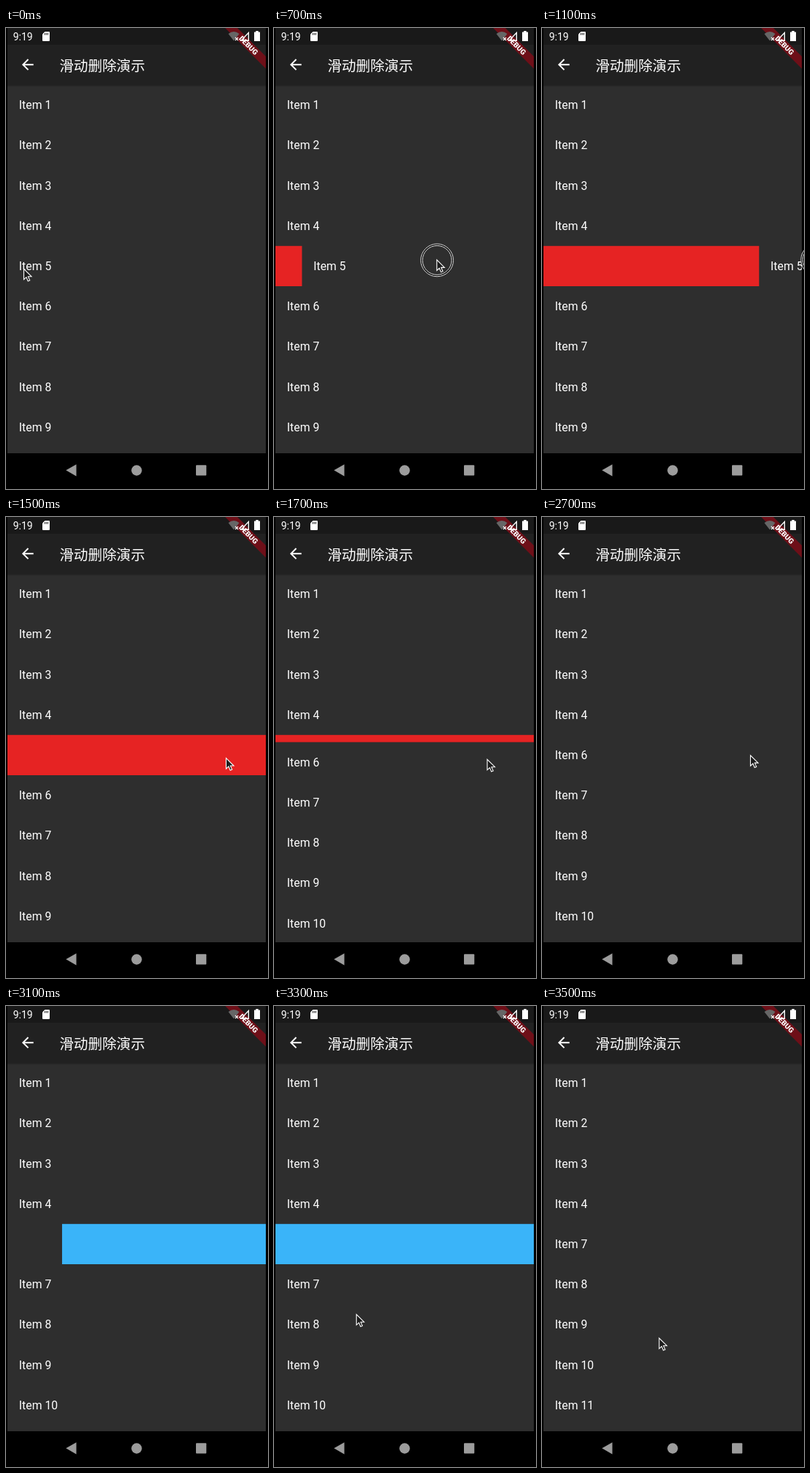
An HTML page for the animation above (3.6 s loop, 360 by 632 pixels).

```html
<!DOCTYPE html>
<html lang="zh">
<head>
<meta charset="utf-8">
<title>滑动删除演示</title>
<style>
  html, body { margin: 0; width: 100%; height: 100%; overflow: hidden; background: #000; }
  svg { display: block; width: 360px; height: 632px; }
  text { font-family: Roboto, "Noto Sans", sans-serif; fill: #fff; }
  .title { font: 500 19.6px "Noto Sans CJK SC", "Noto Sans CJK", sans-serif; }
  .item { font-size: 15.8px; }
  .time { font-size: 14px; }
  .debug { font-size: 10px; font-weight: 900; text-anchor: middle; }
</style>
</head>
<body>
<svg viewBox="0 0 360 632">
  <defs>
    <clipPath id="screen"><path d="M2 0H357V583H2Z"/></clipPath>
    <linearGradient id="shade" x2="0" y2="1">
      <stop stop-color="#000" stop-opacity=".3"/>
      <stop offset="1" stop-color="#000" stop-opacity="0"/>
    </linearGradient>
  </defs>

  <g clip-path="url(#screen)">
    <path fill="#2e2e2e" d="M2 78H357V583H2Z"/>
    <g id="list">
      <rect id="red" x="2" fill="#e62323"/>
      <rect id="blue" fill="#3ab4f9"/>
    </g>
    <path fill="#212121" d="M2 23H357V78H2Z"/>
    <path fill="#191919" d="M2 0H357V23H2Z"/>
    <path fill="url(#shade)" d="M2 78H357V81H2Z"/>
    <path fill="#fff" transform="translate(18 38.3) scale(.987)"
      d="M20 11H7.83l5.59-5.59L12 4l-8 8 8 8 1.41-1.41L7.83 13H20v-2z"/>
    <text class="title" x="73.5" y="58.5">滑动删除演示</text>

    <text class="time" x="9.7" y="16.6">9:19</text>
    <path fill="#fff" d="M53.5 5H59Q60 5 60 6V17Q60 18 59 18H51Q50 18 50 17V8.5Z"/>
    <path stroke="#191919" d="M53.5 7V9.5M55.5 7V9.5M57.5 7V9.5"/>

    <g transform="translate(357 0) rotate(45)">
      <path fill="#6e0f18" d="M-40 27.6H40V39.5H-40Z"/>
      <text class="debug" y="37.1">DEBUG</text>
    </g>
    <path fill="#666" d="M305.5 8Q313 2 320.5 8L313 17.5Z"/>
    <path stroke="#fff" stroke-width="1.3" d="M315 13l4 4m0-4l-4 4"/>
    <path fill="none" stroke="#fff" stroke-width="1.4" d="M333.3 6.5V17.3H323Z"/>
    <path fill="#fff" d="M341 5.5H343.3V4H346.7V5.5H349V18H341Z"/>
  </g>

  <g fill="#9c9c9c">
    <path d="M82.4 606.3L96.6 598.2V614.4Z"/>
    <circle cx="179.5" cy="606.5" r="7.2"/>
    <rect x="261" y="599.3" width="14.3" height="14.3" rx="1"/>
  </g>

  <g id="pointer">
    <g id="ring" fill="none" transform="translate(.3 .7)">
      <circle r="21.2" stroke="#111" stroke-width="3"/>
      <circle r="22.4" stroke="#ddd"/>
      <circle r="20" stroke="#ddd"/>
    </g>
    <path fill="#1c1c1c" stroke="#fff" stroke-width="1.1"
      d="M0 .3V14.8L3.4 11.6L5.7 17L8.2 15.9L5.9 10.7H10.5Z"/>
  </g>
</svg>
<script>
const LOOP = 3600, STEP = 100, COLLAPSE = 180;
const ROW = 55.2, TOP = 78, LEFT = 2, RIGHT = 357, WIDTH = RIGHT - LEFT;
const $ = id => document.getElementById(id);

// Pointer stops: time, x, y
const stops = [
  [0, 24.5, 330], [600, 137, 318], [1100, 378, 317], [1700, 293, 332],
  [2300, 306, 330], [2900, 284, 326], [3100, -30, 325], [3500, 161, 455]
];

// Each swipe: item number, direction, slide start and end, collapse start, touch start and end
const swipes = [
  { item: 5, dir: 1, from: 661, to: 1401, shut: 1596, down: 600, up: 1200 },
  { item: 6, dir: -1, from: 2959, to: 3220, shut: 3320, down: 2900, up: 3100 }
];

// Quadratic ease-out between two times
function ease(t, from, to) {
  const p = Math.min(1, Math.max(0, (t - from) / (to - from)));
  return p * (2 - p);
}

function set(el, attrs) {
  for (const k in attrs) el.setAttribute(k, attrs[k]);
}

function pointerAt(t) {
  const i = Math.max(1, stops.findIndex(s => s[0] >= t));
  const [t0, x0, y0] = stops[i - 1], [t1, x1, y1] = stops[i];
  const p = ease(t, t0, t1);
  return [x0 + (x1 - x0) * p, y0 + (y1 - y0) * p];
}

const items = Array.from({ length: 12 }, (_, i) => {
  const el = document.createElementNS("http://www.w3.org/2000/svg", "text");
  el.textContent = "Item " + (i + 1);
  set(el, { class: "item" });
  $("list").append(el);
  return el;
});

function draw(t) {
  let y = TOP;
  items.forEach((el, i) => {
    const swipe = swipes.find(s => s.item === i + 1);
    let height = ROW, shift = 0;
    if (swipe) {
      const width = WIDTH * ease(t, swipe.from, swipe.to);
      height *= 1 - ease(t, swipe.shut, swipe.shut + COLLAPSE);
      shift = swipe.dir * width;
      const right = swipe.dir > 0;
      set($(right ? "red" : "blue"), { x: right ? LEFT : RIGHT - width, y, width, height });
    }
    set(el, { x: 17.8 + shift, y: y + 33.1 });
    y += height;
  });

  const pressed = swipes.some(s => t >= s.down && t < s.up);
  set($("pointer"), { transform: `translate(${pointerAt(t).join(" ")})` });
  set($("ring"), { visibility: pressed ? "visible" : "hidden" });
}

const start = performance.now();
function frame() {
  const t = (performance.now() - start) % LOOP;
  draw(Math.floor(t / STEP) * STEP);
  requestAnimationFrame(frame);
}
frame();
</script>
</body>
</html>
```
